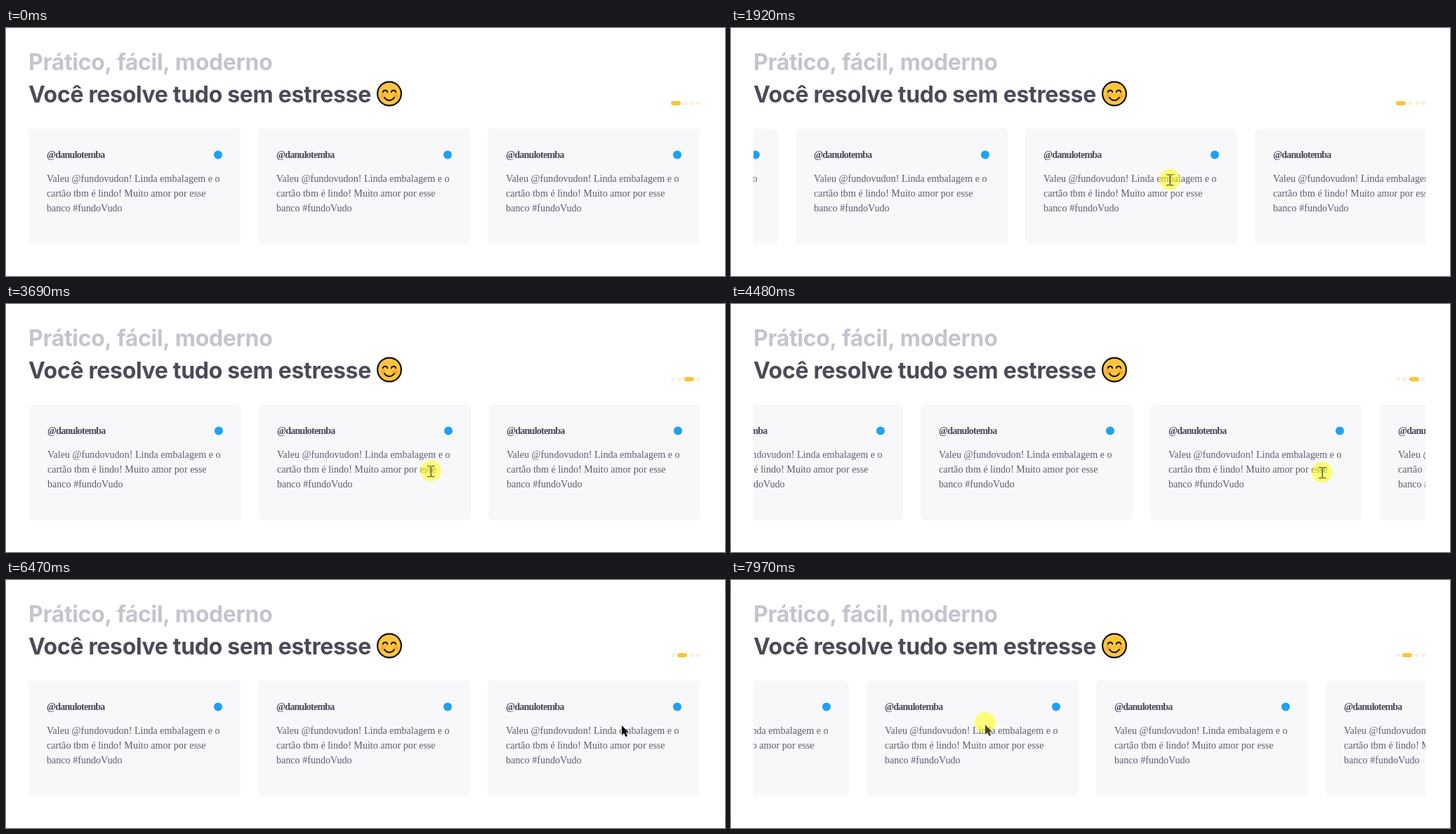
Write an HTML page with a canvas that moves like this. It is 1024 px wide and 353 px high and loops after 8 s.

```html
<!DOCTYPE html>
<html lang="pt-BR">
<head>
<meta charset="utf-8">
<title>Depoimentos</title>
<style>
  html, body { margin: 0; width: 100%; height: 100%; overflow: hidden; background: #fff; }
  canvas { display: block; width: 1024px; height: 353px; }
</style>
</head>
<body>
<canvas id="stage"></canvas>
<script>
const W = 1024, H = 353, LOOP = 8000;
const canvas = document.getElementById('stage');
const ctx = canvas.getContext('2d');
const ratio = window.devicePixelRatio || 1;
canvas.width = W * ratio;
canvas.height = H * ratio;

const PITCH = 327, LEFT = 32, RIGHT = 989;
const SNAP = 400, PAGER_DELAY = 360, PAGER_FADE = 160;
const SANS = 'Inter, "Open Sans", sans-serif';
const SERIF = '"Liberation Serif", serif';
const INK = '#0d0d12';
const LINES = [
  'Valeu @fundovudon! Linda embalagem e o',
  'cartão tbm é lindo! Muito amor por esse',
  'banco #fundoVudo'
];

// Pointer glides; those with a page are drags that snap to it on release
const ENTRY = { x: 947, y: 333 };
const MOVES = [
  { start: 460, end: 870, x: 903, y: 242 },
  { start: 1270, end: 1451, x: 892, y: 215 },
  { start: 1451, end: 2490, x: 269, y: 218, page: 2 },
  { start: 2640, end: 3640, x: 604, y: 238 },
  { start: 3640, end: 5275, x: 1060, y: 242, page: 1 },
  { start: 5400, end: 5850, x: 1030, y: 322 },
  { start: 5850, end: 6470, x: 877, y: 207 },
  { start: 6600, end: 6700, x: 855, y: 206 },
  { start: 6700, end: 8367, x: 280, y: 206, page: 2 }
];
MOVES.forEach((m, i) => { m.from = MOVES[i - 1] || ENTRY; });
const DRAGS = MOVES.filter(m => m.page);

const clamp = v => Math.min(1, Math.max(0, v));
const mix = (a, b, k) => a + (b - a) * k;
const smooth = k => k * k * (3 - 2 * k);
const easeOut = k => 1 - (1 - k) * (1 - k);

function pointerAt(t) {
  const m = MOVES.filter(m => t >= m.start).pop() || MOVES[0];
  const k = smooth(clamp((t - m.start) / (m.end - m.start)));
  return { x: mix(m.from.x, m.x, k), y: mix(m.from.y, m.y, k) };
}

function offsetAt(t) {
  let offset = 0;
  for (const d of DRAGS.filter(d => t >= d.start)) {
    offset += pointerAt(Math.min(t, d.end)).x - d.from.x;
    offset = mix(offset, -d.page * PITCH, easeOut(clamp((t - d.end) / SNAP)));
  }
  return offset;
}

function box(x, y, w, h, r, fill) {
  ctx.fillStyle = fill;
  ctx.beginPath();
  ctx.roundRect(x, y, w, h, r);
  ctx.fill();
}

function disc(x, y, r, fill) {
  ctx.fillStyle = fill;
  ctx.beginPath();
  ctx.arc(x, y, r, 0, Math.PI * 2);
  ctx.fill();
}

function arc(x, y, r, from, to) {
  ctx.beginPath();
  ctx.arc(x, y, r, from * Math.PI, to * Math.PI);
  ctx.stroke();
}

function write(str, x, y, font, fill, spacing = 0) {
  ctx.font = font;
  ctx.fillStyle = fill;
  ctx.letterSpacing = spacing + 'px';
  ctx.fillText(str, x, y);
}

function drawSmiley(x, y) {
  disc(x, y, 18, INK);
  disc(x, y, 15.8, '#ffc43c');
  ctx.strokeStyle = INK;
  ctx.lineWidth = 2;
  ctx.lineCap = 'round';
  for (const side of [-1, 1]) {
    disc(x + 9 * side, y + 3.5, 3.6, '#fba63a');
    arc(x + 6 * side, y - 1.5, 3.3, 1.08, 1.92);
  }
  arc(x, y + 1.5, 8, 0.17, 0.83);
}

function drawHeader() {
  const font = `700 32px ${SANS}`;
  write('Prático, fácil, moderno', 32, 60, font, '#c5c4ce', -0.33);
  write('Você resolve tudo sem estresse', 32, 106, font, '#4b4a58', -0.33);
  drawSmiley(546, 93.5);
}

function drawPager(t) {
  const active = [1, 0, 0, 0];
  for (const d of DRAGS) {
    const k = clamp((t - d.end - PAGER_DELAY) / PAGER_FADE);
    active.forEach((on, n) => { active[n] = mix(on, n === d.page ? 1 : 0, k); });
  }
  let x = 947;
  for (const on of active) {
    const w = 6 + 8 * on;
    const rgb = [mix(250, 253, on), mix(240, 196, on), mix(223, 56, on)];
    box(Math.round(x), 104, w, 6, 3, `rgb(${rgb.map(Math.round)})`);
    x += w + 10 / 3;
  }
}

function drawCard(x) {
  box(x, 143, 302, 165, 6, '#f8f8fb');
  write('@danulotemba', x + 26, 185, `700 14px ${SERIF}`, '#48475a', -0.75);
  disc(x + 270, 180.5, 6, '#1da1f2');
  LINES.forEach((line, i) => write(line, x + 26, 219 + 21 * i, `14.1px ${SERIF}`, '#5d5c6b'));
}

function drawCards(t) {
  const shift = ((Math.round(offsetAt(t)) % PITCH) + PITCH) % PITCH;
  ctx.save();
  ctx.beginPath();
  ctx.rect(LEFT, 140, RIGHT - LEFT, 172);
  ctx.clip();
  for (let x = LEFT + shift - PITCH; x < RIGHT; x += PITCH) drawCard(x);
  ctx.restore();
}

function drawArrow(x, y) {
  const outline = [[0, 0], [0, 14], [3.2, 11], [5.5, 16.2], [8, 15.1], [5.8, 10.1], [10, 10]];
  ctx.beginPath();
  outline.forEach(([dx, dy]) => ctx.lineTo(x + dx, y + dy));
  ctx.closePath();
  ctx.lineWidth = 1;
  ctx.lineJoin = 'round';
  ctx.strokeStyle = '#fff';
  ctx.stroke();
  ctx.fillStyle = '#000';
  ctx.fill();
}

function drawBeam(x, y) {
  ctx.fillStyle = '#222';
  ctx.fillRect(x - 0.5, y - 7, 1.6, 15);
  for (const dy of [-8, 7]) {
    ctx.fillRect(x - 5, y + dy, 4.5, 1.3);
    ctx.fillRect(x + 1, y + dy, 4.5, 1.3);
  }
}

function drawPointer(t) {
  if (t < MOVES[0].start) return;
  const p = pointerAt(t);
  const x = Math.round(p.x), y = Math.round(p.y);
  const beam = t > 720 && t < 5300;
  const pressed = DRAGS.some(d => t >= d.start && t < d.end);
  if (pressed) disc(x, beam ? y - 0.5 : y - 3, 15, 'rgba(255, 255, 0, 0.52)');
  ctx.globalAlpha = pressed ? 0.7 : 1;
  (beam ? drawBeam : drawArrow)(x, y);
  ctx.globalAlpha = 1;
}

function draw(t) {
  ctx.setTransform(ratio, 0, 0, ratio, 0, 0);
  ctx.fillStyle = '#fff';
  ctx.fillRect(0, 0, W, H);
  drawHeader();
  drawPager(t);
  drawCards(t);
  drawPointer(t);
}

const begin = performance.now();
function frame() {
  draw((performance.now() - begin) % LOOP);
  requestAnimationFrame(frame);
}
frame();
</script>
</body>
</html>
```
